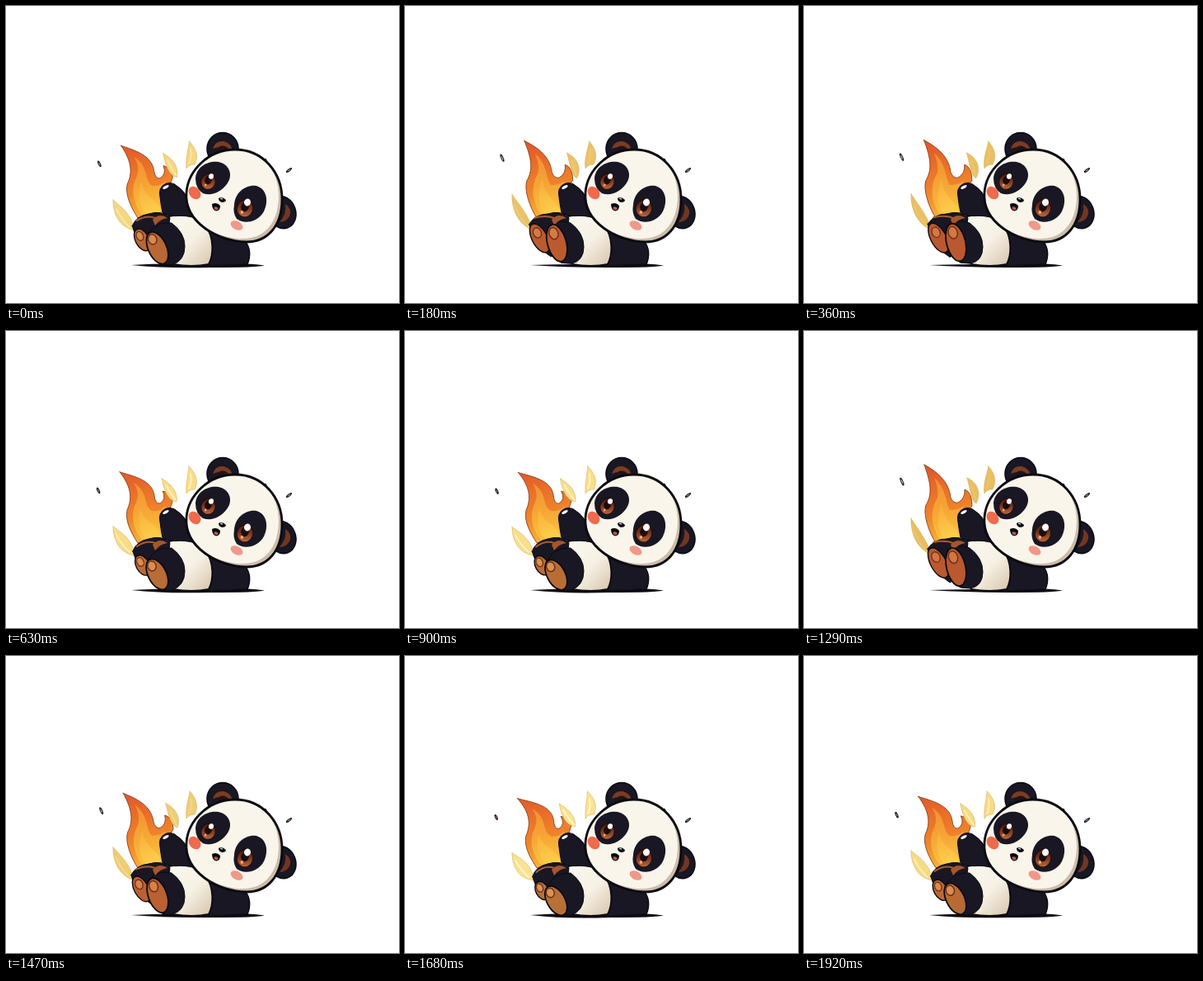
Recreate the animation shown at these times as an HTML page with a canvas. Size 477 px wide and 360 px high, loop 1.95 s.

```html
<!DOCTYPE html>
<html lang="en">
<head>
<meta charset="utf-8">
<title>Panda by the fire</title>
<style>
html, body { margin: 0; width: 100%; height: 100%; overflow: hidden; background: #fff; }
canvas { display: block; width: 477px; height: 360px; }
</style>
</head>
<body>
<canvas id="stage" width="477" height="360"></canvas>
<script>
const ctx = document.getElementById('stage').getContext('2d');
const LOOP = 1950, STEP = 30;
const SWAY = LOOP / 2, PEAK = 290;
const INK = '#0a0a11', FUR = '#191724', CREAM = '#f9f5ea';

// 0 = flame leaning left, 1 = upright; swings slightly below 0
let p = 0;
function swayAt(t) {
  const wave = .5 + .5 * Math.cos(2 * Math.PI * (t - PEAK) / SWAY);
  return (wave - .2) / .8;
}
const mix = (a, b) => a + (b - a) * p;
const pt = (x0, y0, x1, y1) => mix(x0, x1).toFixed(2) + ' ' + mix(y0, y1).toFixed(2);
const tint = (a, b) => `rgb(${a.map((v, i) => Math.round(mix(v, b[i]))).join()})`;

function paint(path, fill, stroke, width = 1) {
  if (fill) { ctx.fillStyle = fill; ctx.fill(path); }
  if (stroke) { ctx.strokeStyle = stroke; ctx.lineWidth = width; ctx.stroke(path); }
}
function shape(d, fill, stroke, width) {
  paint(new Path2D(d), fill, stroke, width);
}
function oval(x, y, rx, ry, deg, fill, stroke, width) {
  const o = new Path2D();
  o.ellipse(x, y, rx, ry, deg * Math.PI / 180, 0, Math.PI * 2);
  paint(o, fill, stroke, width);
}
function ramp(x0, y0, x1, y1, ...colors) {
  const g = ctx.createLinearGradient(x0, y0, x1, y1);
  colors.forEach((c, i) => g.addColorStop(i / (colors.length - 1), c));
  return g;
}

function shadow() {
  shape(`M152 314 Q190 ${mix(311.5, 313)} 231 313 Q282 310 314 314.5
    Q306 317 247 317 Q193 ${mix(318.5, 316.5)} 152 314Z`, INK);
}

function flame() {
  const tip = pt(138, 171, 146, 162);
  shape(`M${tip}
    C${pt(154, 176, 159, 169)} ${pt(177, 180, 176, 181)} ${pt(180, 199, 178, 202)}
    Q${pt(181, 210, 181, 209)} ${pt(187, 209, 187, 208)}
    Q${pt(195, 204, 196, 203)} ${pt(190, 194, 195, 192)}
    Q${pt(201, 196, 204, 195)} ${pt(202, 207, 204, 212)}
    Q198 218 195 228 L194 255 L160 257
    C${pt(153, 246, 152, 245)} ${pt(144, 231, 144, 222)} ${pt(147, 217, 148, 211)}
    C${pt(153, 204, 156, 198)} ${pt(153, 190, 154, 184)} ${tip}Z`,
    ramp(150, 166, 172, 256, '#e2562a', '#ea7029', '#f0872b', '#f9b537'), '#7d4426', .9);

  shape(`M${pt(155, 184, 158, 178)}
    C${pt(174, 196, 173, 190)} ${pt(166, 211, 172, 210)} ${pt(177, 218, 177, 217)}
    Q${pt(186, 220, 188, 217)} 194 212
    Q187 231 191 253 L166 254
    C${pt(153, 240, 153, 236)} ${pt(151, 221, 153, 217)} ${pt(158, 208, 162, 202)}
    Q${pt(163, 196, 164, 191)} ${pt(155, 184, 158, 178)}Z`,
    ramp(160, 180, 174, 255, '#f08f34', '#f6a535', '#fcc540'));

  shape(`M${pt(163, 214, 167, 208)} Q${pt(166, 228, 169, 225)} 179 235
    Q186 241 189 251 L171 253 Q157 239 ${pt(163, 214, 167, 208)}Z`,
    ramp(165, 212, 178, 252, '#f8ad39', '#fdcf4b'));
}

function leaf(d, vein) {
  const tone = tint([247, 221, 137], [232, 190, 98]);
  shape(d, tone, '#dcae58', .6);
  shape(vein, null, tint([255, 241, 190], [235, 196, 106]), 1.8);
}

function wisps() {
  leaf(`M${pt(130, 237, 130, 227)}
    C${pt(138, 243, 136, 237)} ${pt(154, 252, 147, 250)} 156 272
    C${pt(138, 269, 138, 265)} ${pt(130, 254, 129, 246)} ${pt(130, 237, 130, 227)}Z`,
    `M${pt(134, 247, 133, 241)} Q140 259 150 268`);
  leaf(`M${pt(189, 179, 198, 178)}
    C${pt(198, 184, 208, 182)} ${pt(209, 193, 217, 194)} ${pt(207, 207, 209, 209)}
    C${pt(198, 206, 204, 207)} ${pt(192, 196, 202, 193)} ${pt(189, 179, 198, 178)}Z`,
    `M${pt(194, 187, 204, 188)} Q${pt(200, 198, 207, 197)} ${pt(206, 205, 208, 206)}`);
  leaf(`M${pt(222, 164, 224, 164)}
    C${pt(231, 173, 232, 173)} 234 183 229 192
    Q222 192 219 197
    C${pt(218, 185, 217, 185)} ${pt(221, 176, 222, 174)} ${pt(222, 164, 224, 164)}Z`,
    `M${pt(224, 173, 225, 174)} Q226 183 222 191`);
}

function spark(x, y, deg, len, core) {
  oval(x, y, 1.6, len, deg, '#1f1c22');
  oval(x, y, .6, len - 2, deg, core);
}

function ears() {
  oval(263, 173, 19, 19.5, 0, FUR, INK, 1.6);
  shape('M251 173 Q254 163 264 164 Q273 166 275 175 Q262 168 251 173Z', '#7b3c22');
  shape('M256 174 Q260 167 268 171 L273 177 L255 178Z', '#21131a');
  oval(335, 250, 16.5, 20, -20, FUR, INK, 1.6);
  shape('M339 240 Q348 246 344 255 Q340 262 332 262 Q341 252 339 240Z', '#713720');
}

function torso() {
  shape('M242 262 C260 274 282 274 290 285 C297 293 297 304 293 313 L247 315 L229 304Z', FUR, INK, 1.4);
  shape('M189 258 C208 250 230 252 242 266 C253 281 252 302 246 313 Q226 317 203 313Z',
    ramp(204, 260, 250, 306, '#f9f6ec', '#f6f1e4', '#dccbb5'), INK, 2);
  shape(`M187 231 C184 217 198 210 207 218 Q217 224 222 238
    Q231 249 241 257 Q225 255 211 254 Q198 256 190 250 Q188 240 187 231Z`, FUR, INK, 1.2);
  oval(194, 219.5, 4, 1.6, -28, '#fff');
}

function feet() {
  const sole = tint([184, 108, 54], [186, 88, 46]);
  const pad = tint([219, 142, 80], [212, 118, 66]);

  // far leg
  shape(`M${pt(154, 267, 150, 264)} Q${pt(158, 255, 158, 252)} 173 252
    Q190 247 199 257 L196 278 Q188 300 ${pt(178, 297, 177, 305)}
    Q${pt(160, 290, 156, 292)} ${pt(154, 267, 150, 264)}Z`, FUR, INK, 1);
  shape(`M${pt(159, 261, 157, 256)} Q171 253 181 257`, null, '#a75d33', 2);
  oval(mix(166, 163), mix(284, 281), mix(8, 9.5), mix(13, 20), -28, sole, INK, 1.4);
  oval(mix(163, 160), mix(280, 274), mix(4, 5), mix(5.5, 6.5), -24, pad, '#6b2f1c', 1.3);

  // near leg
  shape(`M${pt(174, 276, 174, 266)} Q${pt(181, 262, 186, 257)} 201 263
    Q217 275 ${pt(217, 291, 217, 292)}
    Q217 309 ${pt(201, 314, 202, 312)}
    L${pt(190, 314, 190, 311)} Q174 303 ${pt(174, 276, 174, 266)}Z`, FUR, INK, 1);
  shape('M178 259 Q186 250 196 257 Q187 258 181 266Z', '#a4572f');
  oval(mix(183.5, 184.5), mix(295, 286), mix(11, 11.5), mix(20, 23.5), mix(-27, -13), sole, INK, 1.8);
  oval(mix(177, 181), mix(285, 274), mix(5, 5.5), mix(6, 7.5), -18, pad, '#6b2f1c', 1.5);
}

function eye(x, y, rx, ry, hx, hy, r) {
  oval(x, y, rx, ry, 18, '#25100e');
  oval(x, y + 1, rx - 1.4, ry - 1.6, 18, ramp(x, y - ry, x, y + ry, '#3a150f', '#75351f', '#c06a3a'));
  oval(x, y - 1, rx * .45, ry * .5, 18, '#1b0c0f');
  oval(hx, hy, r, r * 1.1, 18, '#fff');
  oval(x - rx * .35, y + ry * .48, r * .45, r * .5, 0, '#f0a873');
}

function head() {
  const face = new Path2D(`M219 226 C221 200 245 174 278 174 C312 174 335 202 335 234
    C335 266 318 286 292 286 C258 286 216 262 219 226Z`);
  paint(face, '#cdbcaa');
  ctx.save();
  ctx.clip(face);
  ctx.translate(-4, -4);
  paint(face, CREAM);
  ctx.restore();
  paint(face, null, INK, 2.8);

  oval(229, 226.5, 6.5, 8.5, -40, '#f06a4c');
  oval(280, 266, 8, 5, 28, '#f0988a');

  shape('M230 209 C231 195 245 187 258 189 C272 192 276 206 268 216 C261 225 250 231 239 227 Q230 221 230 209Z', FUR);
  shape('M277 241 C278 226 291 216 304 218 C317 222 319 237 313 249 C306 262 289 265 280 258 Q275 251 277 241Z', FUR);
  eye(245.5, 212, 9.5, 10.5, 249, 206.5, 3);
  eye(290, 244.5, 10.5, 11.5, 293, 238, 4);

  shape('M258 233 Q262 230 267 235 Q267 238 262 238 Q258 237 258 233Z', INK);
  oval(261.5, 233.6, 1.8, .8, 20, '#cfc8c4');
  shape('M250 240 Q256 237 260 242 Q260 248 255 248.5 Q250 247 250 240Z', INK);
  oval(255, 245.2, 2.6, 1.9, 18, '#b9594c');
}

function draw(ms) {
  p = swayAt(Math.floor(ms % LOOP / STEP) * STEP);
  ctx.fillStyle = '#fff';
  ctx.fillRect(0, 0, 477, 360);
  ctx.lineJoin = ctx.lineCap = 'round';

  shadow();
  flame();
  wisps();
  ears();
  torso();
  feet();
  head();

  spark(mix(112, 119), mix(193.5, 182.5), -24, mix(4, 5.2), tint([170, 140, 110], [200, 200, 195]));
  spark(343.5, 199, 52, 4.4, '#b38d76');
  oval(315, 186, 1.6, .9, 35, INK);
}

const start = performance.now();
function tick(now) {
  draw(Math.max(0, now - start));
  requestAnimationFrame(tick);
}
draw(0);
requestAnimationFrame(tick);
</script>
</body>
</html>
```
